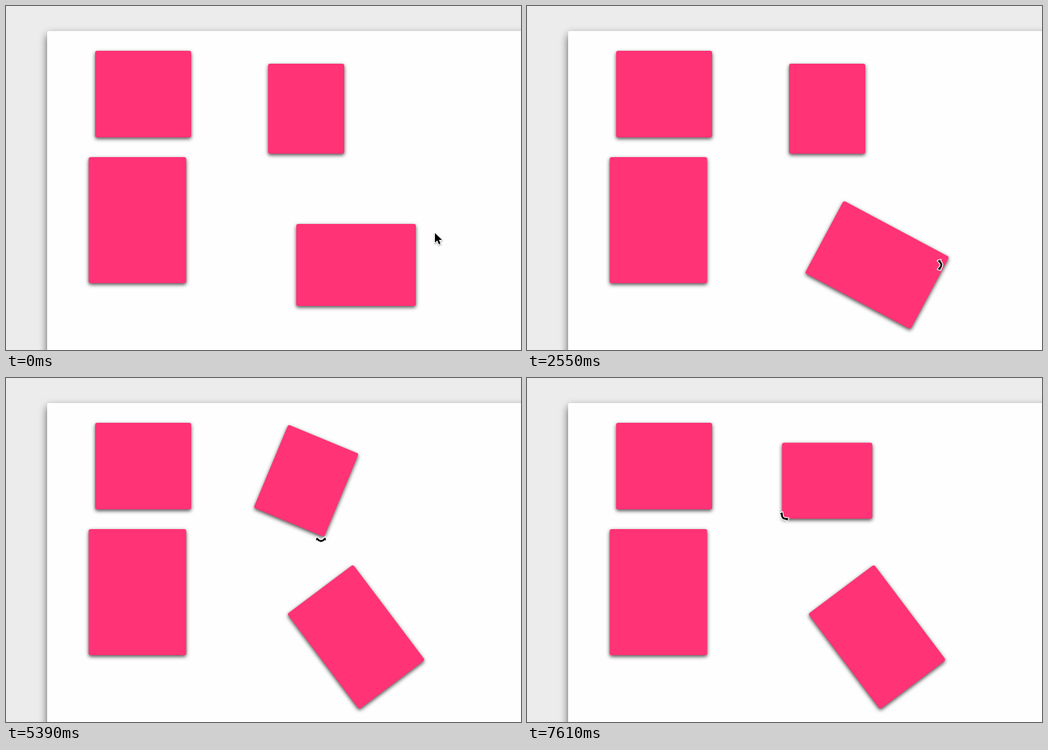
Animation of 676x453 px, one loop 8000 ms. Source, as an HTML page with a canvas:

```html
<!DOCTYPE html>
<html lang="en">
<head>
<meta charset="utf-8">
<title>Rotating rectangles</title>
<style>
  html, body { margin: 0; width: 100%; height: 100%; overflow: hidden; background: #ececec; }
  canvas { display: block; width: 676px; height: 453px; }
</style>
</head>
<body>
<canvas id="stage" width="676" height="453"></canvas>
<script>
const ctx = document.getElementById('stage').getContext('2d');
const LOOP = 8000;
const BEAT = 149.05; // the picture changes only on whole beats
const RAD = Math.PI / 180;
const PINK = '#ff3376';

const box = (x, y, w, h) => ({ cx: x + w / 2, cy: y + h / 2, w, h });
const wide = box(381, 287, 157, 108);
const tall = box(344, 76, 100, 118.5);
const still = [box(117, 59, 126, 114), box(108.5, 199, 128, 166)];

// Pointer moves, timed in beats; each may turn a rectangle
const moves = [
  { from: 2, to: 6, a: [562, 297.5], b: [536, 292] },
  { from: 12.73, to: 20.8, a: [542, 294], mid: [543, 339], b: [521.5, 364], rect: wide, turn: [0, 53.1] },
  { from: 22, to: 28, a: [521.5, 364], b: [441, 190] },
  { from: 33, to: 41, a: [437, 197], mid: [404, 216], b: [358, 215], rect: tall, turn: [0, 60] },
  { from: 41, to: 44, a: [358, 215], b: [329, 222], rect: tall, turn: [60, 73] },
  { from: 47, to: 51, a: [329, 222], b: [337, 183], rect: tall, turn: [73, 90] }
];

const mix = (a, b, p) => a + (b - a) * p;
const progress = (m, n) => Math.min(1, Math.max(0, (n - m.from) / (m.to - m.from)));

function angleOf(rect, n) {
  const m = moves.findLast(m => m.rect === rect && m.from <= n);
  return m ? mix(...m.turn, progress(m, n)) : 0;
}

// A line, or a curve that passes through mid half way
function pointerAt(n) {
  const m = moves.findLast(m => m.from <= n) || moves[0];
  const p = progress(m, n);
  return m.a.map((a, i) => {
    const line = mix(a, m.b[i], p);
    const bulge = m.mid ? m.mid[i] - (a + m.b[i]) / 2 : 0;
    return line + bulge * 4 * p * (1 - p);
  });
}

function setShadow(alpha, blur, y) {
  ctx.shadowColor = `rgba(0,0,0,${alpha})`;
  ctx.shadowBlur = blur;
  ctx.shadowOffsetY = y;
}

function drawBoard() {
  ctx.fillStyle = '#ececec';
  ctx.fillRect(0, 0, 676, 453);
  ctx.save();
  setShadow(0.62, 11, 5);
  ctx.fillStyle = '#fefefe';
  ctx.beginPath();
  ctx.roundRect(54, 33, 760, 560, 2);
  ctx.fill();
  ctx.restore();
}

function drawRect(r, angle = 0) {
  ctx.save();
  ctx.translate(r.cx, r.cy);
  ctx.rotate(angle * RAD);
  setShadow(0.7, 5, 2);
  ctx.fillStyle = PINK;
  ctx.beginPath();
  ctx.roundRect(-r.w / 2, -r.h / 2, r.w, r.h, 2.5);
  ctx.fill();
  ctx.restore();
}

const arrow = new Path2D('M1 1.4V14.2L4.1 11.3L6.2 16.3L8.4 15.4L6.3 10.5H10.4Z');
const bow = new Path2D('M-1.4 -5Q4.6 0 -1.4 5');
const heads = new Path2D('M-3.4 -5.6L0.6 -6.8L-0.4 -2.8ZM-3.4 5.6L0.6 6.8L-0.4 2.8Z');

function outline(path, color, width) {
  ctx.lineJoin = 'round';
  ctx.strokeStyle = color;
  ctx.lineWidth = width;
  ctx.stroke(path);
}

function drawArrow(x, y) {
  ctx.save();
  ctx.translate(x, y);
  setShadow(0.35, 2, 1);
  outline(arrow, '#fff', 2.2);
  setShadow(0, 0, 0);
  ctx.fillStyle = '#000';
  ctx.fill(arrow);
  ctx.restore();
}

// The handle bulges outward and snaps to eighths of a turn
function drawHandle(x, y, angle) {
  ctx.save();
  ctx.translate(x, y);
  ctx.rotate(Math.round(angle / 45) * 45 * RAD);
  outline(heads, '#fff', 2.2);
  outline(bow, '#fff', 4.6);
  outline(bow, '#000', 2.4);
  ctx.fillStyle = '#000';
  ctx.fill(heads);
  ctx.restore();
}

function draw(t) {
  const n = Math.floor(t / BEAT);
  const wideAngle = angleOf(wide, n);
  const tallAngle = angleOf(tall, n);

  drawBoard();
  still.forEach(r => drawRect(r));
  drawRect(tall, tallAngle);
  drawRect(wide, wideAngle);

  const [x, y] = pointerAt(n);
  if (n >= 28) drawHandle(x, y, tallAngle + 45);
  else if (n >= 6 && n < 21) drawHandle(x, y, wideAngle - 45);
  else drawArrow(x, y);
}

const start = performance.now();
function tick() {
  draw((performance.now() - start) % LOOP);
  requestAnimationFrame(tick);
}
tick();
</script>
</body>
</html>
```
